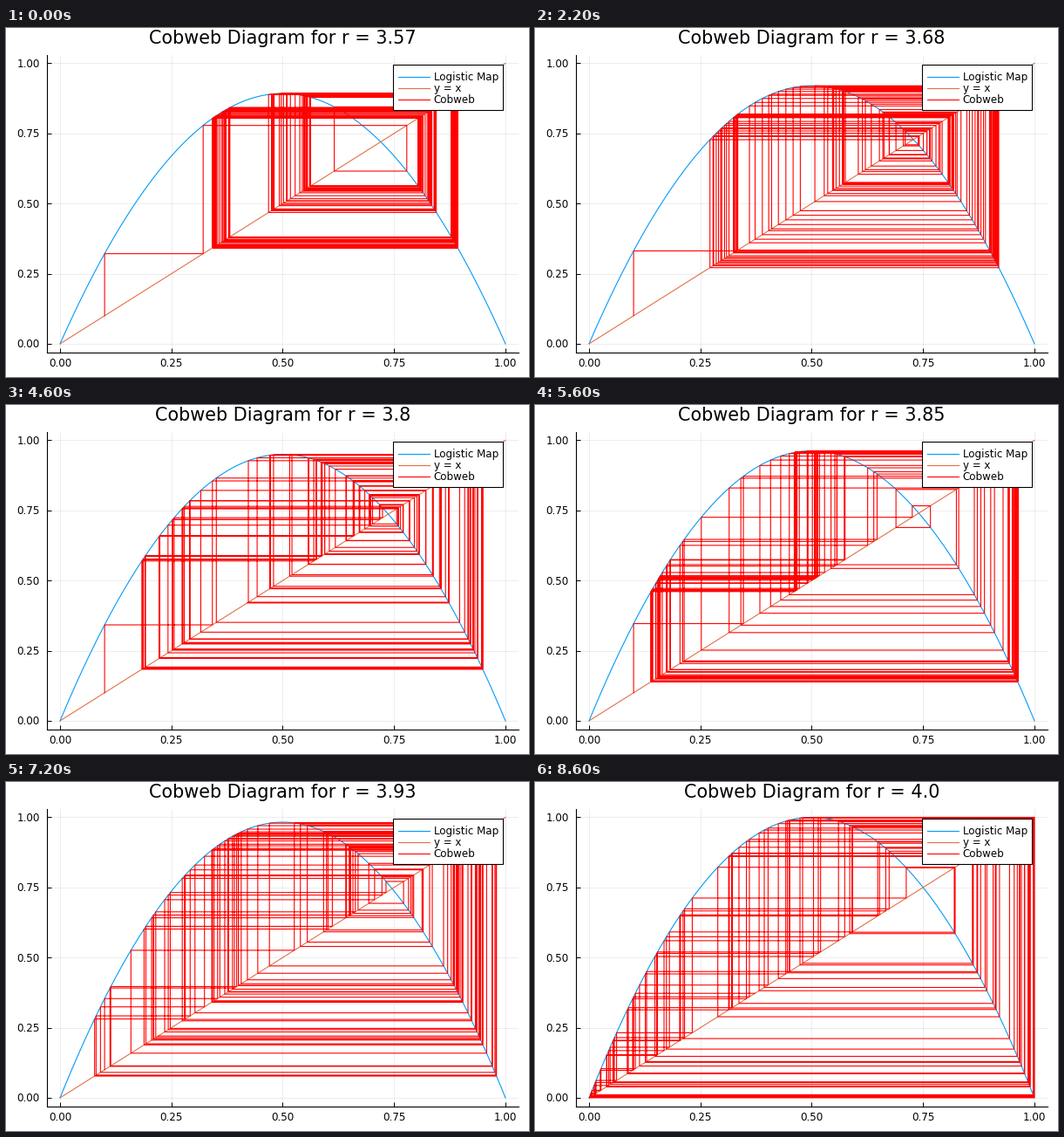
A matplotlib script for the animation above (8800 ms loop, 600 px wide and 400 px high).

```python
import matplotlib.pyplot as plt
import numpy as np
from matplotlib.animation import FuncAnimation
from matplotlib.lines import Line2D
from matplotlib.patches import Rectangle

W, H, DPI = 600, 400, 100
FRAMES, INTERVAL = 44, 200
LEFT, RIGHT, TOP, BOTTOM = 46.7, 588.3, 30.8, 371.6
BLUE, ORANGE, RED = "#009afa", "#e36f47", "#ff0000"
X0, STEPS = 0.1, 100

plt.rcParams["font.family"] = "DejaVu Sans"
plt.rcParams["path.simplify"] = False


def px(size):
    """Pixels to points."""
    return size * 72 / DPI


def label(x, y, text, size=11.9, ha="center", va="center_baseline", z=8):
    return fig.text(x / W, 1 - y / H, text, fontsize=px(size), ha=ha, va=va, zorder=z)


def stroke(xs, ys, color, width=1.1, z=6):
    """Line in stage pixels, y pointing down."""
    line = Line2D(np.array(xs) / W, 1 - np.array(ys) / H, color=color,
                  lw=px(width), transform=fig.transFigure, zorder=z)
    fig.add_artist(line)


def cobweb(r):
    x = X0
    xs, ys = [x], [x]
    for _ in range(STEPS):
        y = r * x * (1 - x)
        xs += [x, y]
        ys += [y, y]
        x = y
    return xs, ys


fig = plt.figure(figsize=(W / DPI, H / DPI), dpi=DPI, facecolor="white")
ax = fig.add_axes([LEFT / W, 1 - BOTTOM / H, (RIGHT - LEFT) / W, (BOTTOM - TOP) / H])
ax.set(xlim=(-0.03, 1.03), ylim=(-0.03, 1.03))

ticks = np.linspace(0, 1, 5)
ax.set_xticks(ticks, [])
ax.set_yticks(ticks, [])
ax.tick_params(direction="in", length=px(5), width=px(1))
ax.grid(color="black", alpha=0.1, lw=px(0.7))
ax.set_axisbelow(True)
ax.spines[["top", "right"]].set_visible(False)
ax.spines[["left", "bottom"]].set_linewidth(px(1.1))

for t in ticks:
    label(LEFT + (t + 0.03) / 1.06 * (RIGHT - LEFT), 388, f"{t:.2f}", va="baseline")
    label(38.7, BOTTOM - (t + 0.03) / 1.06 * (BOTTOM - TOP) + 4.4, f"{t:.2f}",
          ha="right", va="baseline")

grid_x = np.linspace(0, 1, 201)
curve, = ax.plot([], [], color=BLUE, lw=px(1.1), zorder=3)
ax.plot([0, 1], [0, 1], color=ORANGE, lw=px(1.1), zorder=3.1)
web, = ax.plot([], [], color=RED, lw=px(1.1), zorder=3.2,
               solid_joinstyle="miter", snap=False)

fig.add_artist(Rectangle((444 / W, 1 - 94 / H), 126 / W, 52 / H, fc="white", ec="black",
                         lw=px(1.1), transform=fig.transFigure, zorder=5))
for row, (name, color) in enumerate(
        [("Logistic Map", BLUE), ("y = x", ORANGE), ("Cobweb", RED)]):
    y = 55.5 + 13 * row
    stroke([449.5, 485.5], [y, y], color)
    label(490.7, y + 4.4, name, ha="left", va="baseline")

title = label(317.5, 18.5, "", size=20.8, va="baseline")


def update(i):
    r = (357 + i) / 100
    curve.set_data(grid_x, r * grid_x * (1 - grid_x))
    web.set_data(*cobweb(r))
    title.set_text(f"Cobweb Diagram for r = {r}")
    return curve, web, title


anim = FuncAnimation(fig, update, frames=FRAMES, interval=INTERVAL,
                     repeat=True, repeat_delay=0, blit=False)
plt.show()
```
